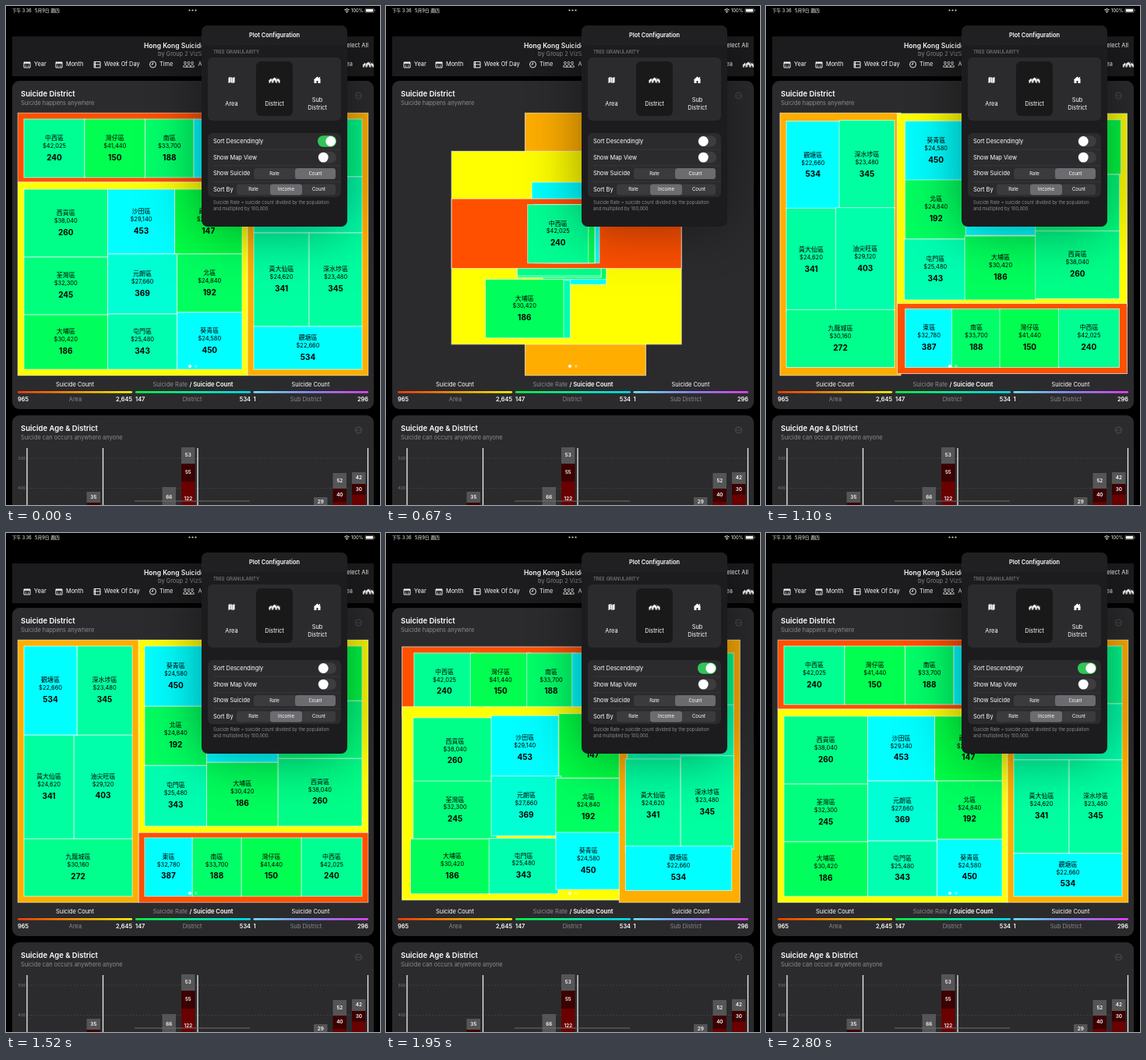
An HTML page with a canvas that plays this animation: 480x640 px, repeating every 2.85 s.

```html
<!DOCTYPE html>
<html lang="en">
<head>
<meta charset="utf-8">
<title>Suicide District treemap</title>
<style>
html, body { margin: 0; width: 100%; height: 100%; overflow: hidden; background: #000; }
canvas { display: block; }
</style>
</head>
<body>
<canvas id="stage" width="480" height="640"></canvas>
<script>
const c = document.getElementById('stage').getContext('2d');
const GRAY = '#8b8b90', CARD = '#2b2b2d', PANEL = '#1c1c1e';

// ---------- drawing helpers ----------
function box(x0, y0, x1, y1, fill, r = 0) {
  c.fillStyle = fill;
  c.beginPath();
  c.roundRect(x0, y0, x1 - x0, y1 - y0, r);
  c.fill();
}
function text(s, x, y, { size = 7.4, color = '#fff', weight = 400, align = 'left' } = {}) {
  c.font = `${weight} ${size}px Inter, "Noto Sans CJK TC", "Noto Sans CJK", sans-serif`;
  c.fillStyle = color;
  c.textAlign = align;
  c.textBaseline = 'middle';
  c.fillText(s, x, y);
}
const mid = (s, x, y, o) => text(s, x, y, { align: 'center', ...o });
const right = (s, x, y, o) => text(s, x, y, { align: 'right', ...o });
function line(x0, y0, x1, y1, color, width = 1, dash = []) {
  c.strokeStyle = color;
  c.lineWidth = width;
  c.setLineDash(dash);
  c.beginPath();
  c.moveTo(x0, y0);
  c.lineTo(x1, y1);
  c.stroke();
  c.setLineDash([]);
}
function dot(x, y, r, color) {
  c.fillStyle = color;
  c.beginPath();
  c.arc(x, y, r, 0, 7);
  c.fill();
}
// SVG path centred on x, y
function icon(d, x, y, { color = '#fff', fill = false, width = .9 } = {}) {
  c.save();
  c.translate(x, y);
  c.strokeStyle = c.fillStyle = color;
  c.lineWidth = width;
  const p = new Path2D(d);
  fill ? c.fill(p) : c.stroke(p);
  c.restore();
}
const CALENDAR = 'M-4-3h8v7h-8zM-4-1.4h8M-4-2.4h8M-2 1h1M1 1h1M-2 2.6h1M1 2.6h1';
const WEEK = 'M-4-3.5h8v7.5h-8zM-4 0h8M-2.5-3.5v7.5';
const CLOCK = 'M4 0A4 4 0 1 1-4 0A4 4 0 1 1 4 0M0-2.5V0H-2';
const HOUSE = 'M0-4.5L4.8-.3L4-.3V4H1V1H-1V4H-4V-.3H-4.8zM2.4-4h1.2v2h-1.2z';
const MAP = 'M-4-3L-1.6-4V3L-4 4zM-1.1-4L1.1-3V4L-1.1 3zM1.6-3L4-4V3L1.6 4z';
const PERSON = 'M-1.4-2.2A1.4 1.4 0 1 1 1.4-2.2A1.4 1.4 0 1 1-1.4-2.2M-2.2 3.3C-2.2-.8 2.2-.8 2.2 3.3z';
function houses(x, y) {
  for (const [dx, dy, s] of [[-4.4, 1, .7], [4.4, 1, .7], [0, 0, .8]]) {
    c.save();
    c.translate(x + dx, y + dy);
    c.scale(s, s);
    icon(HOUSE, 0, 0, { fill: true });
    icon(HOUSE, 0, 0, { color: '#222', width: .5 });
    c.restore();
  }
}

// ---------- treemap ----------
// name, median income, count, blue part of the fill; in descending order of income
const areas = [
  { color: '#ff5000', from: [15, 137, 310, 226], to: [170, 384, 465, 474], cells: [
    ['中西', '42,025', 240, 146], ['灣仔', '41,440', 150, 80], ['南', '33,700', 188, 104],
    ['東', '32,780', 387, 255]] },
  { color: '#ffff00', from: [15, 226, 310, 474], to: [170, 137, 465, 384], cells: [
    ['西貢', '38,040', 260, 136], ['荃灣', '32,300', 245, 124], ['大埔', '30,420', 186, 92],
    ['離島', '29,980', 147, 68], ['沙田', '29,140', 453, 255], ['元朗', '27,660', 369, 212],
    ['屯門', '25,480', 343, 176], ['北', '24,840', 192, 96], ['葵青', '24,580', 450, 255]] },
  { color: '#ffae00', from: [310, 137, 465, 474], to: [15, 137, 170, 474], cells: [
    ['九龍城', '30,160', 272, 140], ['油尖旺', '29,120', 403, 170], ['黃大仙', '24,620', 341, 160],
    ['深水埗', '23,480', 345, 160], ['觀塘', '22,660', 534, 255]] },
];

// A layout is a set of strips, each cut at the given edges
function layout(fill) {
  const rects = {};
  const strip = place => (a, b, edges, names) => names.split(' ').forEach((n, i) => {
    rects[n] = place(a, b, edges[i], edges[i + 1]);
  });
  fill(strip((a, b, e, f) => [e, a, f, b]), strip((a, b, e, f) => [a, e, b, f]));
  return rects;
}
const descending = layout((row, col) => {
  row(145, 220, [23, 101, 178.5, 241, 302], '中西 灣仔 南 東');
  col(23, 130.5, [235, 322, 396, 466], '西貢 荃灣 大埔');
  row(235, 318, [130.5, 216.5, 303], '沙田 離島');
  col(130.5, 219.5, [318, 395, 466], '元朗 屯門');
  col(219.5, 303, [318, 393, 466], '北 葵青');
  col(318, 457, [145, 219, 291], '九龍城 油尖旺');
  row(291, 411, [318, 389, 457], '黃大仙 深水埗');
  row(411, 466, [318, 457], '觀塘');
});
const ascending = layout((row, col) => {
  row(391, 466, [178, 239, 302, 379, 457], '東 南 灣仔 中西');
  col(178, 257.5, [145, 222, 298, 376], '葵青 北 屯門');
  row(145, 215, [257.5, 362, 457], '元朗 離島');
  col(257.5, 349, [215, 294, 376], '沙田 大埔');
  col(349, 457, [215, 289, 376], '荃灣 西貢');
  row(145, 259, [23, 91, 162], '觀塘 深水埗');
  row(259, 392, [23, 87, 162], '黃大仙 油尖旺');
  row(392, 466, [23, 162], '九龍城');
});

function tile(a, b, p, color) {
  const [x0, y0, x1, y1] = a.map((v, i) => v + (b[i] - v) * p);
  box(x0, y0, x1, y1, color);
  c.strokeStyle = 'rgba(255,255,255,.65)';
  c.lineWidth = 1;
  c.strokeRect(x0, y0, x1 - x0, y1 - y0);
  return [(x0 + x1) / 2, (y0 + y1) / 2];
}
// p runs from the descending to the ascending layout; the last in sort order lies on top
function treemap(p, isDescending) {
  const sorted = list => isDescending ? list : [...list].reverse();
  c.save();
  c.beginPath();
  c.rect(14.5, 136.5, 451, 338);
  c.clip();
  for (const { color, from, to, cells } of sorted(areas)) {
    tile(from, to, p, color);
    for (const [name, income, count, blue] of sorted(cells)) {
      const [x, y] = tile(descending[name], ascending[name], p, `rgb(0,255,${blue})`);
      mid(name + '區', x, y - 13, { size: 8, color: '#000' });
      mid('$' + income, x, y - 3, { size: 7.5, color: '#000' });
      mid(count, x, y + 12, { size: 10, weight: 700, color: '#000' });
    }
  }
  c.restore();
  dot(236, 462, 2, '#fff');
  dot(244, 462, 2, 'rgba(255,255,255,.35)');
}

// ---------- page ----------
function statusBar() {
  text('下午 3:36', 8, 6, { size: 5.6 });
  text('5月9日 週四', 37, 6, { size: 5.8 });
  for (const x of [235.5, 239.5, 243.5]) dot(x, 5.5, 1.1, '#ddd');
  icon('M-3.2-1Q0-3.8 3.2-1M-1.9.5Q0-1.2 1.9.5', 437.5, 6, { width: 1 });
  dot(437.5, 7.8, .9, '#fff');
  text('100%', 443, 6, { size: 5.8 });
  icon('M-5.5-2.5h11v5h-11z', 466.5, 5.7, { color: '#888', width: .7 });
  box(461.8, 4, 471.2, 7.4, '#fff', .8);
  box(472.8, 4.8, 473.8, 6.6, '#888');
}
function header() {
  box(8, 39, 472, 90, PANEL);
  text('Hong Kong Suicide', 177, 51, { size: 8.5, weight: 600 });
  text('by Group 2 VizS', 195, 62, { color: GRAY });
  right('Select All', 465, 50.5);
  icon(CALENDAR, 27, 75);
  text('Year', 36, 75);
  icon(CALENDAR, 68, 75);
  text('Month', 77, 75);
  icon(WEEK, 117, 75);
  text('Week Of Day', 126, 75);
  icon(CLOCK, 188.5, 75);
  text('Time', 197, 75);
  for (const dx of [-4.6, 4.6, 0]) icon(PERSON, 234.5 + dx, 75, { width: .8 });
  text('Age', 246.5, 75);
  right('Area', 445, 75);
  c.save();
  c.beginPath();
  c.rect(8, 39, 464, 51);
  c.clip();
  houses(465, 75);
  c.restore();
}
function card(y0, y1, title, note) {
  box(8, y0, 472, y1, CARD, 9);
  text(title, 19, y0 + 17.5, { size: 9.5, weight: 600 });
  text(note, 19, y0 + 29, { color: GRAY });
  c.strokeStyle = '#606064';
  c.lineWidth = .7;
  c.beginPath();
  c.arc(452.5, y0 + 19, 4, 0, 7);
  c.stroke();
  for (const dx of [-1.8, 0, 1.8]) dot(452.5 + dx, y0 + 19, .5, '#77777b');
}
function legend(x0, x1, colors, low, label, high, labelX) {
  const g = c.createLinearGradient(x0, 0, x1, 0);
  colors.forEach((k, i) => g.addColorStop(i / (colors.length - 1), k));
  box(x0, 494, x1, 496.6, g, 1.3);
  text(low, x0, 505, { weight: 600 });
  mid(label, labelX, 505, { color: GRAY });
  right(high, x1, 505, { weight: 600 });
}
function legends() {
  mid('Suicide Count', 88.5, 485.5);
  text('Suicide Rate', 188.5, 485.5, { size: 7.6, color: GRAY });
  right('/ Suicide Count', 291.5, 485.5, { size: 7.6, weight: 600 });
  mid('Suicide Count', 391, 485.5);
  legend(15, 162, ['#ff3c00', '#ff9c00', '#ffff00'], '965', 'Area', '2,645', 89);
  legend(166, 314, ['#00ff44', '#00ffa8', '#00e4ff'], '147', 'District', '534', 239);
  legend(317.5, 465, ['#70f0ff', '#8f8cff', '#f040ff'], '1', 'Sub District', '296', 385);
}
function chart() {
  for (const [label, y] of [['500', 580], ['400', 618.5]]) {
    line(27, y, 464, y, '#48484b', .7, [2, 2]);
    right(label, 25.5, y, { size: 5.4, color: '#77777b' });
  }
  for (const x of [27, 124.5, 246, 464.5]) line(x, 567, x, 640, '#eee', 1.3);
  // bar: left edge, segment tops, segment labels
  const shades = ['#555557', '#3c0000', '#6a0000'];
  const bars = [
    [103.5, [623, 637], ['35']],
    [200.5, [617], ['66']],
    [225, [566, 587, 610], ['53', '55', '122']],
    [395, [630], ['29']],
    [419.5, [599, 619, 636], ['52', '40']],
    [444, [598, 613, 627], ['42', '30']],
  ];
  for (const [x, tops, labels] of bars) tops.forEach((y, i) => {
    const end = tops[i + 1] ?? (i ? 654 : 644);
    box(x, y, x + 17.5, end, shades[i]);
    if (labels[i]) mid(labels[i], x + 8.8, Math.min((y + end) / 2, 636), { size: 6.3, weight: 600 });
  });
  line(165, 635, 313, 635, 'rgba(110,110,110,.5)', 2);
}

// ---------- configuration popover ----------
function segments(x0, y, labels, edges, selected) {
  box(x0, y, 423, y + 14, '#3b3b3e', 3.5);
  box(edges[selected], y, edges[selected + 1], y + 14, '#6b6b70', 3.5);
  labels.forEach((s, i) => mid(s, (edges[i] + edges[i + 1]) / 2, y + 7, { size: 6 }));
}
function toggle(y, on) {
  box(400, y, 424, y + 14.6, '#3d3d40', 7.3);
  c.globalAlpha = on;
  box(400, y, 424, y + 14.6, '#32c558', 7.3);
  c.globalAlpha = 1;
  dot(407.3 + 9.4 * on, y + 7.3, 6.4, '#fff');
}
function popover(on) {
  c.save();
  c.shadowColor = 'rgba(0,0,0,.45)';
  c.shadowBlur = 75;
  box(251, 25, 438, 283, PANEL, 8);
  c.restore();
  box(251, 25, 438, 50, '#202022', [8, 8, 0, 0]);
  mid('Plot Configuration', 344.5, 38, { weight: 600 });

  text('TREE GRANULARITY', 266, 59.5, { size: 6, color: GRAY });
  box(259, 66, 430, 147, CARD, 6);
  box(321, 71, 368, 141, '#19191a', 6);
  icon(MAP, 289.5, 95, { fill: true });
  houses(344.5, 95);
  icon(HOUSE, 399.5, 95, { fill: true });
  mid('Area', 289.5, 126);
  mid('District', 344.5, 126);
  mid('Sub', 399.5, 120.5);
  mid('District', 399.5, 131);

  box(259, 163, 430, 245, CARD, 6);
  ['Sort Descendingly', 'Show Map View', 'Show Suicide', 'Sort By'].forEach((s, i) => {
    const y = 173.7 + i * 20.6;
    text(s, 266, y);
    if (i) line(266, y - 10.2, 430, y - 10.2, '#404043', .6);
  });
  toggle(166.2, on);
  toggle(186.8, 0);
  segments(318, 208, ['Rate', 'Count'], [318, 371, 423], 1);
  segments(296, 228.5, ['Rate', 'Income', 'Count'], [296, 339, 380, 423], 1);
  text('Suicide Rate = suicide count divided by the population', 266, 252, { size: 5.8, color: GRAY });
  text('and multiplied by 100,000.', 266, 260, { size: 5.8, color: GRAY });
}

// ---------- timing ----------
const LOOP = 2850;
const ticks = [0, 450, 560, 670, 770, 880, 980, 1100, 1270, 1410, 1520, 1630, 1740,
  1850, 1950, 2120, 2290, 2400, 2520, 2650, 2800];
const OFF = 543, ON = 1519;

// critically damped spring, time in ms
function spring(ms) {
  const x = Math.max(0, ms) * .0119;
  return 1 - (1 + x) * Math.exp(-x);
}
function ease(ms) {
  const x = Math.min(1, Math.max(0, ms / 120));
  return x * x * (3 - 2 * x);
}
function draw(t) {
  box(0, 0, 480, 640, '#000');
  statusBar();
  header();
  card(96, 517, 'Suicide District', 'Suicide happens anywhere');
  treemap(spring(t - OFF) - spring(t - ON), t < OFF || t >= ON);
  legends();
  card(525, 660, 'Suicide Age & District', 'Suicide can occurs anywhere anyone');
  chart();
  popover(1 - ease(t - OFF) + ease(t - ON));
}
const start = performance.now();
function frame() {
  const t = (performance.now() - start) % LOOP;
  draw(ticks.findLast(k => k <= t) ?? 0);
  requestAnimationFrame(frame);
}
frame();
</script>
</body>
</html>
```
